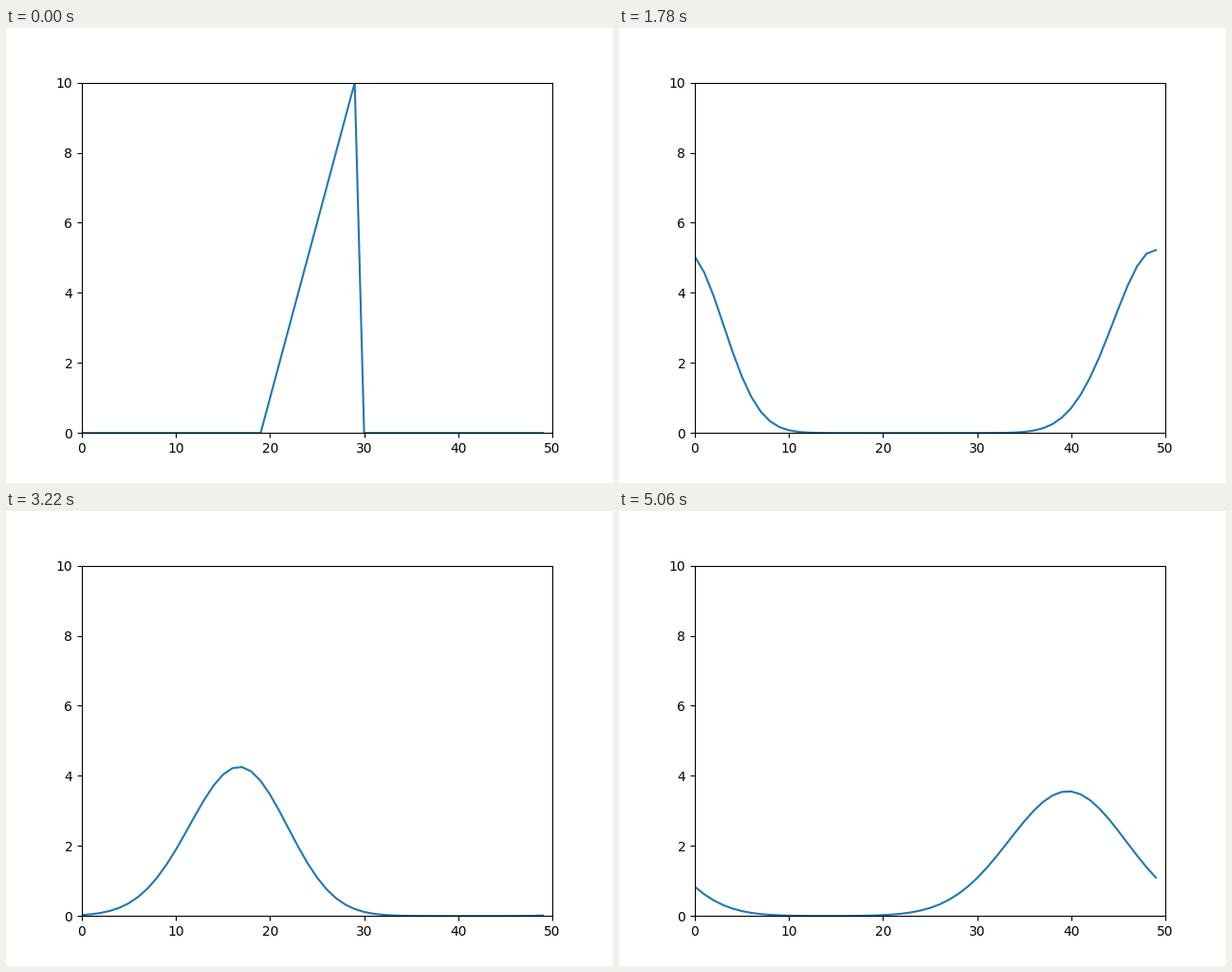
A matplotlib script that plays this animation: 640 by 480 pixels, repeating every 5.1 s.

```python
import numpy as np
import matplotlib.pyplot as plt
from matplotlib.animation import FuncAnimation

CELLS = 50
COURANT = 0.5
TICK = 20            # ms; the wave advances on every second tick
TICKS = 255


def initial_wave():
    u = np.zeros(CELLS)
    u[20:30] = np.arange(1, 11)
    return u


def advect(u):
    """One upwind step on a periodic grid."""
    return u - COURANT * (u - np.roll(u, 1))


waves = [initial_wave()]
for _ in range(TICKS // 2):
    waves.append(advect(waves[-1]))

fig, ax = plt.subplots(figsize=(6.4, 4.8), dpi=100)
ax.set_xlim(0, 50)
ax.set_ylim(0, 10)
line, = ax.plot(np.arange(CELLS), waves[0])


def update(tick):
    line.set_ydata(waves[(tick + 1) // 2])
    return line,


anim = FuncAnimation(fig, update, frames=TICKS, interval=TICK,
                     repeat=True, repeat_delay=0)
plt.show()
```
